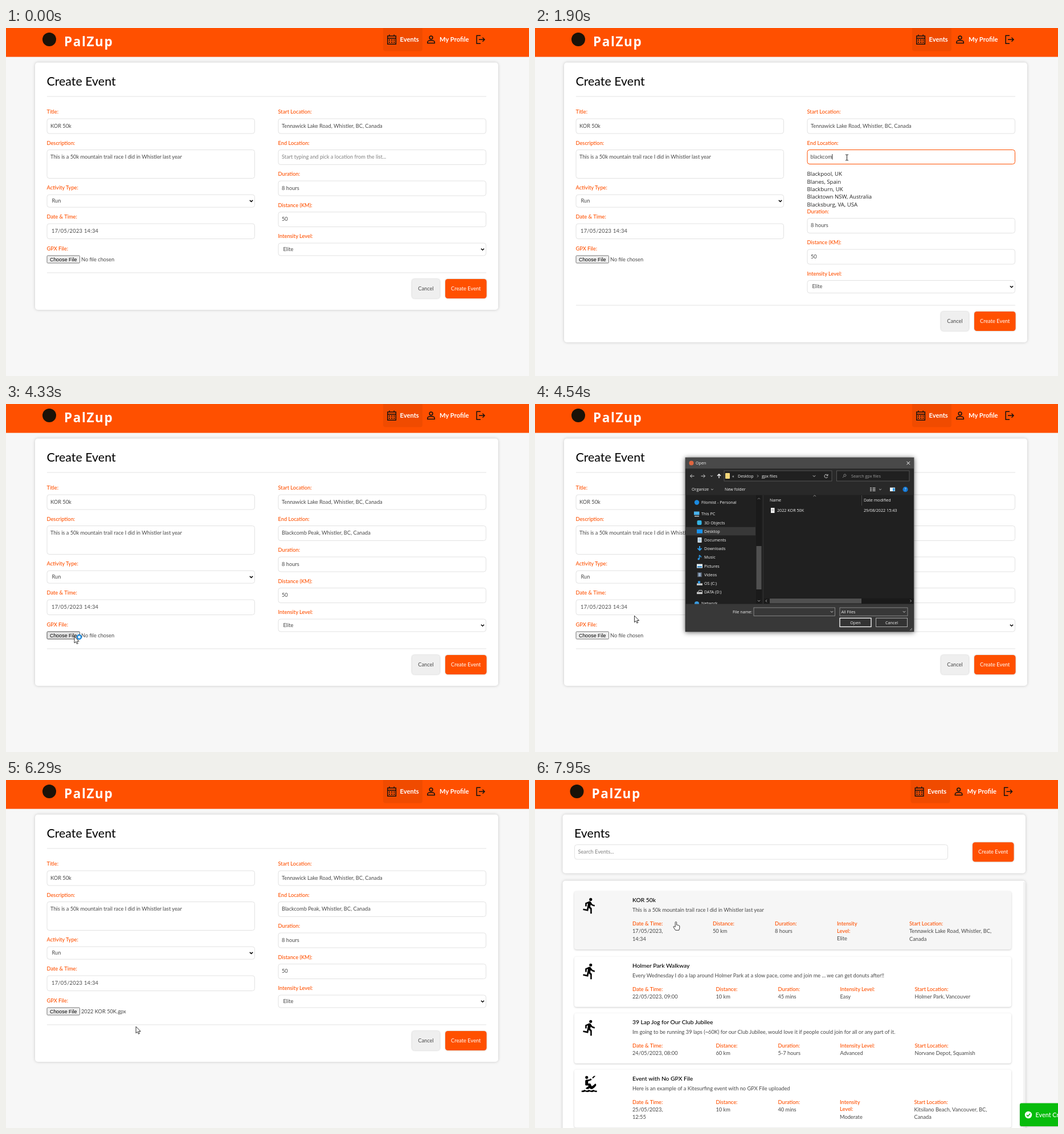
An HTML page that plays this animation: 918x610 px, repeating every 8 s.

```html
<!DOCTYPE html>
<html lang="en">
<head>
<meta charset="utf-8">
<title>Create an event</title>
<style>
  html, body { margin: 0; width: 100%; height: 100%; overflow: hidden; background: #f7f7f7; }
  svg { display: block; }
  text { font: 9.25px Lato, sans-serif; fill: #484848; white-space: pre; }
  .label { font-weight: 500; fill: #ff5000; }
  .heading { font-size: 21.4px; fill: #000; }
  .title { font-size: 10.3px; font-weight: 500; fill: #000; }
  .hint { fill: #808080; }
  .white { fill: #fff; }
  .nav { font-size: 11.2px; font-weight: 700; fill: #fff; }
  .brand { font: 600 22.5px "Noto Sans", sans-serif; letter-spacing: 1.6px; fill: #fff; }
  .date { letter-spacing: .3px; }
  .native { font: 8.9px "Liberation Sans", sans-serif; fill: #000; }
  .place { font: 9.65px "Open Sans", sans-serif; fill: #222; }
  .toast { font-size: 10.8px; font-weight: 500; fill: #fff; }
  .win { font: 7.2px "Open Sans", sans-serif; fill: #f2f2f2; }
  .dim { fill: #9a9a9a; }
  .mid { text-anchor: middle; }
  .card { filter: drop-shadow(0 0 2.5px #0003); }
  .row { filter: drop-shadow(0 1px 1.5px #0003); }
  .button { filter: drop-shadow(.7px .7px 1px #0004); }
  .window { filter: drop-shadow(0 1px 4px #0009); }
</style>
</head>
<body>
<svg id="stage" width="918" height="610" viewBox="0 0 918 610"></svg>
<script>
const ORANGE = '#ff5000', GREY = '#e2e2e2';
const $ = id => document.getElementById(id);

const text = (x, y, s, cls = '') => `<text x="${x}" y="${y}" class="${cls}">${s}</text>`;
const rect = (x, y, w, h, fill, more = '') =>
  `<rect x="${x}" y="${y}" width="${w}" height="${h}" fill="${fill}" ${more}/>`;
const line = (d, color = '#000', width = 1.5) =>
  `<path d="${d}" fill="none" stroke="${color}" stroke-width="${width}"/>`;
const dot = (x, y, r, fill) => `<circle cx="${x}" cy="${y}" r="${r}" fill="${fill}"/>`;
const group = (id, s) => `<g id="${id}">${s}</g>`;
const box = (x, y, w, h, more = '') => rect(x, y, w, h, '#fff', `stroke="${GREY}" rx="4" ${more}`);
const chevron = (x, y, r = 2.6, color = '#000', width = 1.5) =>
  line(`M${x - r} ${y - r / 2}l${r} ${r} ${r}-${r}`, color, width);
const field = (x, y, label, value, h = 26) =>
  text(x, y, label, 'label') + box(x + .5, y + 9, 364.5, h) + text(x + 6.5, y + 24.7, value);
const select = (x, y, label, value) =>
  text(x, y, label, 'label') + box(x + .5, y + 9, 364.5, 22) +
  text(x + 9, y + 22.8, value) + chevron(x + 359, y + 20);
const button = (x, y, w, fill, label, cls) =>
  rect(x, y, w, 34, fill, 'rx="4.5" class="button"') + text(x + w / 2, y + 19.5, label, 'mid ' + cls);

// Page header
const header = rect(0, 0, 918, 50.6, ORANGE) + group('headerItems',
  dot(76, 20, 12, '#1a1208') + text(102, 32, 'PalZup', 'brand') +
  rect(662, -5, 69, 45.5, '#f04b00', 'rx="4"') +
  line('M669.8 14h14.6v14.2h-14.6zM669.8 18h14.6M673 11.5v3M681.2 11.5v3', '#111', 1.4) +
  `<path d="M672 21.2h11M672 24.8h11" stroke="#111" stroke-width="1.7" stroke-dasharray="2 2.2"/>` +
  text(691.5, 24, 'Events', 'nav') +
  line('M743.2 16.8a2.9 2.9 0 1 0 5.8 0a2.9 2.9 0 1 0-5.8 0M739.9 26.6v-1.7c0-4.2 12.4-4.2 12.4 0v1.7z', '#111') +
  text(761, 24, 'My Profile', 'nav') +
  line('M833 13.2h-6.8v14h6.8M830 20.2h10m-3.5-3.5l3.5 3.5-3.5 3.5', '#111'));

// Form page
const form = group('form',
  rect(51, 60.5, 813, 433.5, '#fff', 'rx="5" class="card" id="formCard"') +
  text(71.5, 101, 'Create Event', 'heading') + rect(72, 119.5, 771, 1, '#e4e4e4') +
  field(71.5, 150, 'Title:', 'KOR 50k') +
  field(71.5, 204.5, 'Description:', 'This is a 50k mountain trail race I did in Whistler last year', 50) +
  select(71.5, 283.2, 'Activity Type:', 'Run') +
  text(71.5, 333.8, 'Date & Time:', 'label') + box(72, 343, 364.5, 26.5) +
  text(80, 359.3, '17/05/2023 14:34', 'date') +
  text(71.5, 389.5, 'GPX File:', 'label') +
  rect(72, 399, 57.5, 13, '#efefef', 'stroke="#767676" rx="1.5" id="choose"') +
  text(77, 408.6, 'Choose File', 'native') + `<text id="fileName" x="132" y="408.5"></text>` +
  field(477.5, 150, 'Start Location:', 'Tennawick Lake Road, Whistler, BC, Canada') +
  text(477.5, 204.5, 'End Location:', 'label') + box(478, 213.5, 364.5, 26, 'id="endBox"') +
  `<text id="endText" y="229"></text>` + rect(0, 221, .8, 9.5, '#000', 'id="caret"') +
  group('places', '') +
  group('lower',
    field(477.5, 259, 'Duration:', '8 hours') +
    field(477.5, 313.5, 'Distance (KM):', '50') +
    select(477.5, 368, 'Intensity Level:', 'Elite')) +
  group('footer', rect(72, 428.5, 771, 1, '#e4e4e4') +
    button(712.5, 440, 49, '#efefef', 'Cancel', '') +
    button(771, 440, 72.5, ORANGE, 'Create Event', 'white')));

// File chooser window
const folders = ['3D Objects', 'Desktop', 'Documents', 'Downloads', 'Music', 'Pictures', 'Videos', 'OS (C:)', 'DATA (D:)'];
const folderIcon = (i, y) => [
  rect(284.5, y - 4, 8, 8, '#35b5e6', 'rx="2"'), rect(284, y - 3.5, 10, 7, '#1793f0'),
  rect(285.5, y - 4.5, 7, 9, '#dfe8ee') + line(`M287 ${y - 1.5}h4m-4 3h4`, '#3a8bc8', 1),
  line(`M289 ${y - 4.5}v7m-3.5-3.2l3.5 3.5 3.5-3.5`, '#2d9be8', 2),
  line(`M288.5 ${y + 3}v-7c1 2 3.5 1.5 3 4`, '#2d9be8') + dot(287.2, y + 3, 1.7, '#2d9be8'),
  rect(284, y - 3.5, 10, 7, '#e8f2f8') + rect(285, y, 8, 2.5, '#3a8bc8'),
  rect(285, y - 4, 8, 8, '#56606e') + rect(287, y - 3, 4, 6, '#8fa9c6'),
  rect(284, y, 10, 3.5, '#c9c9c9') + rect(286, y - 4, 4, 4, '#2d9be8'),
  rect(284, y, 10, 3.5, '#c9c9c9') + line(`M286 ${y}l2-3h5l1 3`, '#c9c9c9', 1)][i];
const arrowRight = (x, y, c) => line(`M${x} ${y}h7m-3-3l3 3-3 3`, c, 1);
const dialog = group('dialog',
  rect(264, 94, 401, 305, '#202020', 'stroke="#505050" stroke-width=".8" class="window"') +
  rect(264, 94, 401, 19.5, '#494949') + dot(274.5, 103.5, 4, '#e0653f') +
  text(282, 106.3, 'Open', 'win') + line('M652.5 100.8l5.5 5.5m0-5.5l-5.5 5.5', '#fff', 1) +
  rect(264, 113.5, 401, 46, '#292929') +
  line('M279.5 126.3h-7m3-3l-3 3 3 3', '#ccc', 1) + arrowRight(291.5, 126.3, '#ccc') +
  chevron(310, 126.3, 1.8, '#ccc', 1) + line('M323 130v-7m-3 3l3-3 3 3', '#fff', 1.3) +
  rect(332, 117, 189, 18, '#202020', 'stroke="#606060" stroke-width=".8"') +
  rect(334, 121, 8, 10, '#f5d77a', 'rx="1"') + text(346, 128.8, '«', 'win') +
  text(356, 128.8, 'Desktop', 'win') + line('M390 124.3l2 2-2 2', '#ccc', .8) + text(398, 128.8, 'gpx files', 'win') +
  chevron(490, 126.3, 2.2, '#ccc', 1) + line('M513.5 124.8a3 3 0 1 0 .3 2.8m.2-4.6v2.5h-2.5', '#ccc', 1) +
  rect(529.5, 117, 127.5, 18, '#202020', 'stroke="#606060" stroke-width=".8"') +
  line('M540 129l2.5-2.5a2 2 0 1 1 .4.3', '#999', .9) + text(555, 128.8, 'Search gpx files', 'win dim') +
  text(275, 152.2, 'Organize', 'win') + chevron(311, 149.7, 1.8, '#ccc', 1) + text(333, 152.2, 'New folder', 'win') +
  line('M588 147.2h3m1.5 0h5M588 149.7h3m1.5 0h5M588 152.2h3m1.5 0h5', '#ccc', 1.2) + chevron(606, 149.7, 1.8, '#ccc', 1) +
  rect(623, 146.5, 9, 6.5, '#e8f2f8') + rect(628, 147.5, 3.5, 5, '#2d9be8') +
  dot(650, 149.7, 4.6, '#1478d4') + text(650, 152.4, '?', 'win mid') +
  dot(284, 172.5, 4.2, '#1b8ae0') + text(292, 175, 'Filomist - Personal', 'win') +
  rect(279, 188.5, 9.5, 6, '#4bb4ee') + rect(280, 196, 8, 1.4, '#ccc') + text(292, 195, 'This PC', 'win') +
  rect(264.5, 215.7, 122.5, 14.6, '#383838') +
  folders.map((name, i) => folderIcon(i, 208 + i * 15.2) + text(297, 210.6 + i * 15.2, name, 'win')).join('') +
  dot(284, 350, 4, '#3a9be0') + text(292, 352, 'Network', 'win') +
  rect(388, 160, 10, 190, '#1a1a1a') + rect(388.5, 249, 9, 76, '#505050') +
  line('M390.8 167l2.2-2.2 2.2 2.2', '#777', 1) + chevron(393, 345, 2.2, '#999', 1) + rect(400, 160, .8, 190, '#383838') +
  line('M488.5 162l2.3-2 2.3 2', '#aaa', .8) + text(412, 170.7, 'Name', 'win') + text(577, 170.7, 'Date modified', 'win') +
  rect(573, 160, .8, 18, '#505050') + rect(410, 180, 254.5, 13, '#777', 'id="picked" stroke="#999" stroke-width=".6"') +
  rect(414, 182, 6.5, 9, '#f2f2f2') + line('M415.5 185h3.5m-3.5 2h3.5', '#888', .8) +
  text(425, 189.2, '2022 KOR 50K', 'win') + text(577, 189.2, '29/08/2022 15:43', 'win') +
  rect(402, 340.5, 262.5, 9.5, '#1a1a1a') + rect(412, 341, 161, 8.5, '#505050') +
  line('M407 343.2l-2 2 2 2M658.5 343.2l2 2-2 2', '#aaa', 1) +
  rect(264.4, 350.5, 400.2, 48.2, '#383838') + text(347, 366.8, 'File name:', 'win') +
  rect(384, 357, 142.5, 14.3, '#383838', 'stroke="#999" stroke-width=".8"') +
  `<text id="typedFile" x="386" y="366.8" class="win"></text>` + chevron(521, 364.2, 2.2, '#ccc', 1) +
  rect(535, 357, 119, 14.3, '#383838', 'stroke="#999" stroke-width=".8"') +
  text(537.5, 366.8, 'All Files', 'win') + chevron(648, 364.2, 2.2, '#ccc', 1) +
  rect(535, 375.3, 55, 15.2, '#333', 'stroke="#fff" stroke-width="1.3"') + text(562.5, 385.5, 'Open', 'win mid') +
  rect(598.5, 375.3, 55, 15.2, '#333', 'stroke="#aaa"') + text(626, 385.5, 'Cancel', 'win mid') +
  line('M658 397l4-4m-1.5 4l1.5-1.5', '#aaa', 1));

// Events page
const icon = (y, d) => `<path transform="translate(80.5 ${y + 10}) scale(1.28)" d="${d}"/>`;
const RUNNER = 'M13.5 5.5a2 2 0 1 0 0-4 2 2 0 0 0 0 4zm-3.6 13.9l1-4.4 2.1 2v6h2v-7.5l-2.1-2 .6-3c1.3 1.5 3.3 2.5 5.5 2.5v-2c-1.9 0-3.5-1-4.3-2.4l-1-1.6c-.4-.6-1-1-1.7-1-.3 0-.5.1-.8.1l-5.2 2.2v4.7h2v-3.4l1.8-.7-1.6 8.1-4.9-1-.4 2z';
const SURFER = 'M6 3a2 2 0 1 1 4 0 2 2 0 0 1-4 0zM20.1 1h-2.2l-2.4 2.4 1.1 1.1zM22 23v-2h-2q-1.6 0-3-1-3 2-6 0-3 2-6 0-1.400 1-3 1H1v2h2q1.600 0 3-.75 3 1.500 6 0 3 1.500 6 0 1.400.75 3 .75zM6 13V8a2 2 0 0 1 2-2h2c1.400 0 2.600-.6 3.500-1.500L15 6c-1.300 1.200-3 2-5 2v3.300h3l2 4c2-1.300 3.500-2.600 4.500-3.800 1 0 1.500.8 1.500 1.800 0 1.400-2.200 3.600-5 5.500-1.500.4-3 0-4-1.300-1.200 1.500-3.700 2-5.500.5 1.200-1.100 2.700-2.200 4-3l-.5-1H8c-1.100 0-2-.4-2-1z';
const events = [
  { y: 197.3, h: 102, cols: [171, 312, 421, 530, 657], title: 'KOR 50k',
    about: 'This is a 50k mountain trail race I did in Whistler last year',
    values: ['17/05/2023,|14:34', '50 km', '8 hours', '|Elite', 'Tennawick Lake Road, Whistler, BC,|Canada'] },
  { y: 309.8, h: 88, cols: [171, 317.5, 426.5, 535.5, 666.5], title: 'Holmer Park Walkway',
    about: 'Every Wednesday I do a lap around Holmer Park at a slow pace, come and join me ... we can get donuts after!!',
    values: ['22/05/2023, 09:00', '10 km', '45 mins', 'Easy', 'Holmer Park, Vancouver'] },
  { y: 408.8, h: 88, cols: [171, 317.5, 426.5, 535.5, 666.5], title: '39 Lap Jog for Our Club Jubilee',
    about: 'Im going to be running 39 laps (~60K) for our Club Jubilee, would love it if people could join for all or any part of it.',
    values: ['24/05/2023, 08:00', '60 km', '5-7 hours', 'Advanced', 'Norvane Depot, Squamish'] },
  { y: 507.5, h: 102, cols: [171, 317.5, 426.5, 535, 665.5], title: 'Event with No GPX File', shape: SURFER,
    about: 'Here is an example of a Kitesurfing event with no GPX File uploaded',
    values: ['25/05/2023,|12:55', '10 km', '40 mins', '|Moderate', 'Kitsilano Beach, Vancouver, BC,|Canada'] }];
const labels = ['Date & Time:', 'Distance:', 'Duration:', 'Intensity Level:', 'Start Location:'];
const eventCard = ({ y, h, cols, title, about, values, shape = RUNNER }, i) => group('event' + i,
  rect(69, y, 767, h, '#fff', `rx="4" class="row" id="eventBg${i}"`) + icon(y, shape) +
  text(171, y + 19.5, title, 'title') + text(171, y + 36.3, about) +
  cols.map((x, c) => {
    const wraps = values[c][0] === '|';
    const names = wraps ? labels[c].split(' ') : [labels[c]];
    return names.map((s, n) => text(x, y + 60 + n * 12.8, s, 'label')).join('') +
      values[c].split('|').map((s, n) => text(x, y + 73.2 + n * (wraps ? 12.8 : 13.5), s)).join('');
  }).join(''));
const list = group('events',
  rect(48.5, 60.5, 812.5, 103, '#fff', 'rx="5" class="card"') + text(69, 101, 'Events', 'heading') +
  box(69.5, 113.5, 655, 25.5) + text(75.5, 129, 'Search Events...', 'hint') +
  button(768, 109.3, 72.5, ORANGE, 'Create Event', 'white') +
  rect(48.5, 176.5, 812.5, 450, '#fff', 'rx="5" class="card"') + rect(857, 179, 4, 431, '#f3f3f3') +
  events.map(eventCard).join('') +
  group('toast', rect(851, 566.5, 214, 40.5, '#07bc0c', 'rx="3" class="row"') + dot(866, 587, 6.2, '#fff') +
    line('M863 587l2.2 2.3 4-4.5', '#07bc0c', 1.6) + text(878.5, 590.5, 'Event Created', 'toast')));

const pointers = group('pointer',
  group('arrow', `<path d="M0 0v11.5l2.7-2.4 1.7 3.9 1.9-.8-1.7-3.8h3.6z" fill="#fff" stroke="#000" stroke-width=".8"/>`) +
  group('busy', `<circle cx="8.5" cy="1" r="3.6" fill="#d9efff" stroke="#1583d8" stroke-width="2.2"/>`) +
  group('beam', line('M-2.5-5h2l.5.5.5-.5h2M0-5V5M-2.5 5h2l.5-.5.5.5h2', '#222', 1)) +
  group('hand', `<path d="M-1.3 9V1.2a1.2 1.2 0 0 1 2.4 0V5.6l1.8.2 1.8.5 1.6.9v4l-1.2 3.6h-6l-3.5-5.3c-.7-1.1.8-2 1.6-1.2z" fill="#fff" stroke="#222" stroke-width=".9"/>`));

$('stage').innerHTML = rect(0, 0, 918, 610, '#f7f7f7') + form + list + header + dialog + pointers;

// Timeline: time, x, y, pointer shape
const path = [
  [160, 846, 598, 'arrow'], [300, 792, 470, 'arrow'], [420, 690, 340, 'arrow'], [520, 600, 262, 'arrow'],
  [600, 547.5, 227, 'beam'], [3110, 547.5, 227, 'arrow'], [3300, 528, 256, 'hand'], [3500, 526, 256, 'arrow'],
  [3860, 330, 372, 'arrow'], [3940, 250, 396, 'arrow'], [4040, 160, 416, 'arrow'], [4170, 120, 407.5, 'arrow'],
  [4470, 120, 407.5, 'arrow'], [4900, 450, 187, 'arrow'], [5000, 450, 187, 'arrow'], [5220, 505, 314, 'arrow'],
  [5300, 515, 328, 'arrow'], [5500, 562, 383, 'arrow'], [5900, 562, 385, 'arrow'], [6120, 82, 425, 'arrow'],
  [6290, 226.5, 431.5, 'arrow'], [6450, 480, 546, 'arrow'], [6610, 790, 470, 'hand'], [6680, 808, 460.5, 'hand'],
  [7030, 808, 460.5, 'hand'], [7500, 262, 370, 'hand'], [7650, 214, 248, 'hand'], [7949, 214, 248, 'hand'],
  [7950, 247.5, 248.5, 'hand'], [8000, 247.5, 248.5, 'hand']];
const typing = [[0, ''], [1130, 'b'], [1280, 'bl'], [1350, 'bla'], [1430, 'blac'], [1580, 'black'], [1730, 'blackc'],
  [1800, 'blackco'], [1900, 'blackcom'], [2050, 'blackcomb'], [2360, 'blackcomb p'], [2430, 'blackcomb pe'],
  [2580, 'blackcomb peak'], [3500, 'Blackcomb Peak, Whistler, BC, Canada']];
const places = [
  [0, 0, []],
  [1500, 65.5, ['Blackpool, UK', 'Blanes, Spain', 'Blackburn, UK', 'Blacktown NSW, Australia', 'Blacksburg, VA, USA']],
  [2130, 72.5, ['Blackcomb Peak, Whistler, BC, Canada', 'Blackcomb Way, Whistler, BC, Canada', 'Blackcombe, UK', 'Blackcomb, Whistler, BC, Canada', 'Blackcomb Glacier, BC, Canada']],
  [2730, 65.5, ['Blackcomb Peak, Whistler, BC, Canada', 'Black Peak, WA, USA', 'Blackcomb Peak Trail, BC, Canada', 'Black Peak, AZ, USA', 'Black Peak, CA, USA']],
  [3500, 0, []]];

const latest = (rows, t) => rows.filter(row => row[0] <= t).pop();
const within = (t, from, to) => t >= from && t < to;
const show = (id, on) => $(id).style.display = on ? '' : 'none';
const shift = (id, x, y) => $(id).setAttribute('transform', `translate(${x} ${y})`);

function drawPointer(t) {
  show('pointer', t >= 160);
  const i = Math.max(0, path.findIndex(p => p[0] > t) - 1);
  const [t0, x0, y0, shape] = path[i], [t1, x1, y1] = path[i + 1];
  const k = Math.max(0, (t - t0) / (t1 - t0));
  const x = x0 + (x1 - x0) * k, y = y0 + (y1 - y0) * k;
  shift('pointer', x, y);
  for (const id of ['arrow', 'beam', 'hand']) show(id, id === shape);
  show('busy', within(t, 4330, 4470));
  return y;
}

function drawForm(t) {
  const [, push, names] = latest(places, t);
  const grow = Math.max(0, push - 8.5);
  $('places').innerHTML = names.map((s, i) => text(477.5, 259.3 + i * 13.35, s, 'place')).join('');
  shift('lower', 0, push);
  shift('footer', 0, grow);
  $('formCard').setAttribute('height', 433.5 + grow);

  const value = latest(typing, t)[1], focused = within(t, 680, 4170), field = $('endText');
  field.textContent = value || 'Start typing and pick a location from the list...';
  field.setAttribute('class', value ? '' : 'hint');
  field.setAttribute('x', focused && t < 3500 ? 483.5 : 484);
  $('endBox').setAttribute('stroke', focused ? ORANGE : GREY);
  $('endBox').setAttribute('height', focused ? 25 : 26);
  show('caret', within(t, 680, 900) || within(t, 1130, 2960));
  $('caret').setAttribute('x', 483.5 + (value ? field.getComputedTextLength() : 0));

  $('fileName').textContent = t < 5600 ? 'No file chosen' : '2022 KOR 50K.gpx';
  const hovered = within(t, 4100, 4470);
  $('choose').setAttribute('fill', hovered ? '#e3e3e3' : '#efefef');
  $('choose').setAttribute('stroke', hovered ? '#4f4f4f' : '#767676');
}

function render(t) {
  const onList = t >= 6740;
  show('form', !onList);
  show('events', onList);
  shift('headerItems', onList ? -2.5 : 0, 0);
  const pointerY = drawPointer(t);

  if (onList) {
    events.forEach(({ y, h }, i) => {
      const hovered = within(pointerY, y, y + h);
      shift('event' + i, 0, hovered ? -2.4 : 0);
      $('eventBg' + i).setAttribute('fill', hovered ? '#f6f6f6' : '#fff');
    });
    const left = 1 - Math.min(1, Math.max(0, (t - 7050) / 400));
    shift('toast', 75 * left ** 3, 0);
  } else drawForm(t);

  show('dialog', within(t, 4470, 5600));
  show('picked', t >= 4980);
  $('typedFile').textContent = t >= 4980 ? '2022 KOR 50K' : '';
}

function frame() {
  render(performance.now() % 8000);
  requestAnimationFrame(frame);
}
frame();
</script>
</body>
</html>
```
